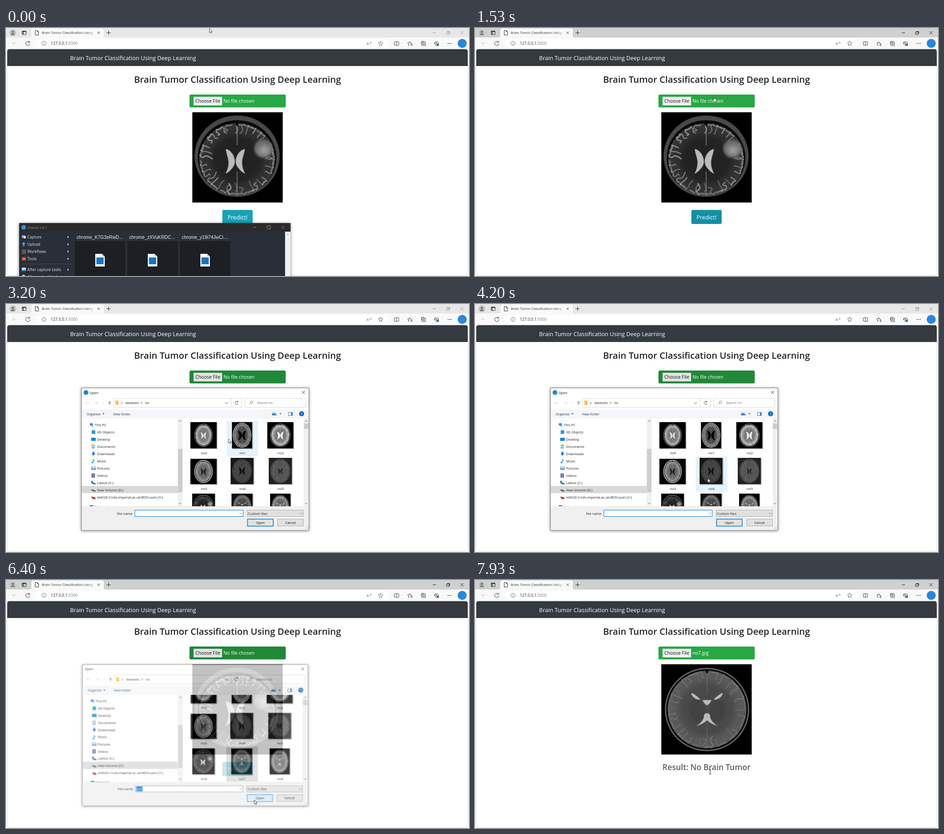
Recreate the animation shown at these times as an HTML page. Size 1022 px wide and 548 px high, loop 8000 ms.

```html
<!DOCTYPE html>
<html lang="en">
<head>
<meta charset="utf-8">
<title>Brain Tumor Classification Using Deep Learning</title>
<style>
html, body { margin: 0; width: 100%; height: 100%; overflow: hidden; background: #fff; }
#stage { display: block; width: 100%; height: 100%; font: 7.5px "Open Sans", "Noto Sans", sans-serif; font-variant-ligatures: none; }
text { white-space: pre; }
.line { fill: none; stroke: var(--c, #333); stroke-width: var(--w, 1px); }
.mid { text-anchor: middle; }
.dark { fill: #212529; }

/* every loop lasts 8 s; .step holds its values, .move blends them */
.move { animation: 8s linear infinite; }
.step { animation: 8s step-end infinite; }

#strip { animation-name: strip; }
@keyframes strip { 0%, 29.8% { fill: #e7e7e7 } 10.8%, 78.3%, to { fill: #d0d0d0 } }
#caption { animation-name: caption; }
@keyframes caption { 0%, 29.8% { stroke: #999 } 10.8%, 78.3%, to { stroke: #222 } }

#input { animation-name: input; }
@keyframes input { 0%, 19.2%, 83%, to { fill: #28a745 } 21%, 81.6% { fill: #218838 } }
#choose { animation-name: choose; }
@keyframes choose { 0%, 81.6%, to { fill: #efefef } 24.5% { fill: #e3e3e3 } }
#nofile { animation-name: nofile; }
@keyframes nofile { 0% { opacity: 1 } 81.6%, to { opacity: 0 } }
#chosen { animation-name: chosen; }
@keyframes chosen { 0% { opacity: 0 } 81.6%, to { opacity: 1 } }
#before { animation-name: before; }
@keyframes before { 0% { opacity: 1 } 80.9%, to { opacity: 0 } }
#after { animation-name: after; }
@keyframes after { 0%, 80.9% { opacity: 0 } 83.4% { opacity: .25 } 85.9% { opacity: .75 } 88.4%, to { opacity: 1 } }
#predict { animation-name: predict; }
@keyframes predict { 0%, 93.3% { opacity: 1 } 93.4%, to { opacity: 0 } }
#predictBox { animation-name: predictBox; }
@keyframes predictBox { 0%, 16.8%, 20.4%, 90% { fill: #17a2b8 } 18%, 18.4%, 92%, to { fill: #138496 } }
#result { animation-name: result; }
@keyframes result { 0%, 94.5% { opacity: 0 } 95.9% { opacity: .1 } 99.1% { opacity: .73 } to { opacity: .85 } }

#tool { animation-name: tool; transform-origin: 328px 548px; }
@keyframes tool { 0%, 10.9% { opacity: 1; transform: none } 13.4%, to { opacity: 0; transform: translateY(60px) scale(.85) } }
#minHover { animation-name: minHover; }
@keyframes minHover { 0%, 10.9%, to { opacity: 0 } 8.6% { opacity: 1 } }

#ghost { animation-name: ghost; }
@keyframes ghost { 0%, 30%, 31.6%, to { opacity: 0 } 30.8%, 31% { opacity: .05 } }
#dialog { animation-name: dialog; transform-origin: 417px 342.5px; }
@keyframes dialog {
  0%, 31.5% { opacity: 0; transform: none } 31.6% { opacity: .5; transform: scale(.98) }
  32.5%, 79.1% { opacity: 1; transform: none } 80% { opacity: .77; transform: scale(.992) }
  81.6%, to { opacity: 0; transform: scale(.95) }
}
#list { animation-name: list; }
@keyframes list { 0%, 34% { opacity: 0; transform: none } 34.1% { opacity: 1; transform: none } 60.8%, to { opacity: 1; transform: translateY(-47px) } }
#hover { animation-name: hover; }
@keyframes hover {
  0%, 60.8%, to { opacity: 0 } 39.8% { opacity: 1; transform: none }
  47.5% { opacity: 1; transform: translateY(79px) } 57.5% { opacity: 1; transform: translateY(158px) }
}
#picked { animation-name: picked; }
@keyframes picked { 0% { opacity: 0 } 60.8% { opacity: 1; fill: #cce8ff; stroke: #99d1ff } 78.2%, to { opacity: 1; fill: #d9d9d9; stroke: #d9d9d9 } }
#caret { animation-name: caret; }
@keyframes caret { 0%, 34%, 47.4%, 60.8%, to { opacity: 0 } 40.8%, 54.1% { opacity: 1 } }
#field { animation-name: field; }
@keyframes field { 0% { stroke: #0078d7 } 78.2%, to { stroke: #8a9aa6 } }
#marked { animation-name: marked; }
@keyframes marked { 0% { opacity: 0 } 78.2%, to { opacity: 1 } }
#name { animation-name: name; }
@keyframes name { 0% { opacity: 0; fill: #111 } 60.8% { opacity: 1; fill: #111 } 78.2%, to { opacity: 1; fill: #fff } }
#combo { animation-name: combo; }
@keyframes combo { 0%, 73%, to { fill: #e1e1e1; stroke: #adadad } 71% { fill: #e5f1fb; stroke: #0078d7 } }
#open { animation-name: open; }
@keyframes open { 0% { fill: #e1e1e1; stroke-width: 1.5px } 74% { fill: #e5f1fb; stroke-width: 1px } 78.2%, to { fill: #d3eaf8; stroke-width: 1px } }
#appDot { animation-name: appDot; }
@keyframes appDot { 0% { opacity: 1 } 78.2%, to { opacity: 0 } }
#openTitle { animation-name: openTitle; }
@keyframes openTitle { 0% { transform: none } 78.2%, to { transform: translateX(-13px) } }

#cursor { animation-name: cursor; }
@keyframes cursor {
  0%, 1.6% { transform: translate(449px, 1px); animation-timing-function: ease-in-out }
  9.1%, 13.4% { transform: translate(550px, 440px) }
  17.5% { transform: translate(520px, 420px) }
  18.4% { transform: translate(524px, 404px) }
  19.1% { transform: translate(528px, 152px) }
  20.9%, 22.5% { transform: translate(500px, 158px) }
  26%, 31% { transform: translate(446px, 153px) }
  32.5%, 33.4% { transform: translate(447px, 163px); animation-timing-function: ease-in-out }
  37.5%, 39.2% { transform: translate(480px, 296px) }
  40% { transform: translate(491px, 298px) }
  42.5%, 45% { transform: translate(503px, 306px) }
  54.1%, 56.6% { transform: translate(516px, 402px) }
  60.8%, 67.5% { transform: translate(510px, 423px); animation-timing-function: ease-in-out }
  76%, 80.5% { transform: translate(548px, 486px); animation-timing-function: ease-in-out }
  88.4%, 89.1% { transform: translate(527px, 439px) }
  92%, to { transform: translate(519px, 424px) }
}
#arrow { animation-name: arrow; }
@keyframes arrow { 0%, 24.2% { opacity: 1 } 17%, 90%, to { opacity: 0 } }
#hand { animation-name: hand; }
@keyframes hand { 0%, 24.2%, 93.4%, to { opacity: 0 } 17%, 90% { opacity: 1 } }
#beam { animation-name: beam; }
@keyframes beam { 0% { opacity: 0 } 93.4%, to { opacity: 1 } }
</style>
</head>
<body>
<svg id="stage" viewBox="0 0 1022 548" xmlns="http://www.w3.org/2000/svg">
  <defs>
    <filter id="soft" x="-40%" y="-40%" width="180%" height="180%"><feGaussianBlur stdDeviation="7"/></filter>
    <filter id="blur" x="-40%" y="-40%" width="180%" height="180%"><feGaussianBlur stdDeviation="2"/></filter>
    <filter id="fine" x="-30%" y="-30%" width="160%" height="160%"><feGaussianBlur stdDeviation=".7"/></filter>
    <linearGradient id="fade"><stop stop-color="#f9f9f9" stop-opacity="0"/><stop offset="1" stop-color="#f9f9f9"/></linearGradient>
    <clipPath id="listClip"><path d="M391 253H657V447H391Z"/></clipPath>
    <clipPath id="treeClip"><path d="M167 253H379V447H167Z"/></clipPath>
  </defs>

  <!-- browser -->
  <rect width="1022" height="548" fill="#f7f7f7"/>
  <rect id="strip" class="step" width="1022" height="21"/>
  <path d="M52 21Q56 21 56 17V5Q56 1 60 1H212Q216 1 216 5V17Q216 21 220 21Z" fill="#f9f9f9"/>
  <rect y="21" width="1022" height="26" fill="#f9f9f9"/>
  <circle cx="15" cy="10.500" r="7.500" fill="#c4c4c4"/>
  <g fill="#777"><circle cx="15" cy="8.500" r="2.600"/><path d="M10.500 15.500Q10.500 12 15 12T19.500 15.500Z"/></g>
  <g class="line">
    <rect x="35.500" y="6.500" width="9" height="8" rx="1.500"/><path d="M35.500 8H44.500M38 8V14" stroke-width="1.600"/>
    <path d="M64.500 5.500H69L72 8.500V15.500H64.500ZM69 5.500V8.500H72"/>
    <path d="M202 8L207 13M207 8L202 13M222 10.500H231M226.500 6V15"/>
    <path d="M14 34H23M18 30L14 34L18 38" stroke="#ccc"/>
    <path d="M51.500 31A4.700 4.700 0 1 0 52.700 34.500M52 28.500V31.500H49"/>
  </g>
  <text x="79" y="13.300" fill="#333">Brain Tumor Classification Using</text>
  <rect x="180" y="3" width="16" height="15" fill="url(#fade)"/>
  <g id="caption" class="line step"><path d="M942 10.500H949M1003 7L1010 14M1010 7L1003 14"/><path d="M972.500 9H978V14H972.500ZM974 9V7.500H979.500V12.500H978"/></g>
  <rect x="66" y="24" width="779" height="20" rx="10" fill="#fff"/>
  <g class="line" style="--w:.9px">
    <circle cx="84" cy="34" r="4.700" stroke="#666"/><path d="M84 33V37M84 31V32" stroke="#666"/>
    <path d="M827 29L828.500 32.300 832 32.700 829.400 35.100 830.100 38.600 827 36.900 823.900 38.600 824.600 35.100 822 32.700 825.500 32.300Z" stroke="#555"/>
    <path d="M803 31Q804.500 33 803 34.500M805 30Q807 33 805 35" stroke="#555" stroke-width=".7"/>
    <path d="M861 30.500H858Q857 30.500 857 31.500V37Q857 38 858 38H861M863 30.500H866Q867 30.500 867 31.500V37Q867 38 866 38H863M862 29V40"/>
    <path d="M891 30L892.200 32.700 895 33M891 30L889.700 32.700 886.500 33.200 889 35.300 888.300 38.500 890.500 37.300M893 35H897M893 37H897M894 39H897"/>
    <path d="M918.500 31.500H926V39H918.500ZM917 36.500V29.500H924M922.200 33V37.500M920 35.200H924.500"/>
    <path d="M950 39L945.500 34.300Q945 31 947.500 30.300 949.500 30.200 950 31.800 950.500 30.200 952.500 30.300 955 31 954.500 34.300ZM946 34H948.500L949.500 32 951 35.500H952"/>
  </g>
  <circle cx="953" cy="37" r="2.700" fill="#2e7d46"/>
  <text x="796" y="37" font-size="8" fill="#555">A</text>
  <g fill="#333"><circle cx="976" cy="34" r=".9"/><circle cx="979.500" cy="34" r=".9"/><circle cx="983" cy="34" r=".9"/></g>
  <circle cx="1007" cy="34" r="10" fill="#2b87dd"/>
  <text x="99" y="37.200" font-size="8.700" fill="#222">127.0.0.1<tspan fill="#767676">:5000</tspan></text>

  <!-- page -->
  <rect x="2.500" y="47" width="1017" height="499" rx="5" fill="#fff" stroke="#e4e4e4"/>
  <path d="M2.700 84V52Q2.700 46.700 8 46.700H1014Q1019.300 46.700 1019.300 52V84Z" fill="#343a40"/>
  <text x="141.500" y="70.500" font-size="12.600" fill="#fff">Brain Tumor Classification Using Deep Learning</text>
  <text class="mid dark" x="511" y="121.300" font-size="20" font-weight="600">Brain Tumor Classification Using Deep Learning</text>
  <rect id="input" class="move" x="405" y="147" width="212.500" height="28.500" rx="3"/>
  <rect id="choose" class="step" x="414" y="152" width="63" height="19"/>
  <g font-size="10.300">
    <text x="418" y="165.300" fill="#111">Choose File</text>
    <text id="nofile" class="step" x="480" y="165.300" fill="#fff">No file chosen</text>
    <text id="chosen" class="step" x="480" y="165.300" fill="#fff">no7.jpg</text>
  </g>
  <g id="before" class="step"></g>
  <g id="after" class="move"></g>
  <g id="predict" class="move">
    <rect id="predictBox" class="move" x="477.500" y="402" width="67" height="31" rx="3.300"/>
    <text class="mid" x="511" y="422.800" font-size="12.600" fill="#fff">Predict!</text>
  </g>
  <text id="result" class="mid dark move" x="511" y="420" font-size="17.400" font-weight="600">Result: No Brain Tumor</text>

  <!-- capture tool -->
  <g id="tool" class="move">
    <rect x="29" y="431" width="599" height="130" fill="#2a2e38" style="filter:drop-shadow(0 1px 3px #0008)"/>
    <rect x="29" y="431" width="599" height="19" fill="#2b2b2b"/>
    <rect id="minHover" class="step" x="535" y="431" width="29" height="19" fill="#454545"/>
    <circle cx="39" cy="440.500" r="5.200" fill="#2f8fd6"/>
    <text x="47" y="443.700" font-size="8" fill="#999">ShareX 14.1</text>
    <path class="line" style="--c:#888" d="M546 440.500H553M576.500 437H583.500V444H576.500ZM608.500 437.500L615 444M615 437.500L608.500 444"/>
    <rect x="616" y="450" width="12" height="98" fill="#efefef"/><rect x="617" y="451" width="10" height="11" fill="#fff"/>
    <path class="line" d="M619.500 458L622 455.500 624.500 458"/>
    <path d="M34 521.500H144" stroke="#454b58"/>
    <path d="M35 458H42V464H35Z" fill="#9ab"/><path d="M39 460H44V465H39Z" fill="#dde"/>
    <path d="M39 472.500L43.500 477.500H40.500V482.500H37.500V477.500H34.500Z" fill="#3ba3e8"/>
    <path d="M35 507H44V514H35ZM37.500 507V505.500H41.500V507" fill="#d33a32"/><path d="M35 510H44" stroke="#fbb"/>
    <path d="M35 529.500H44V537H35Z" fill="#cfe2f5"/><path d="M35 537L38 533 40 535 42 532 44 537Z" fill="#4a90d0"/>
    <path d="M35 548Q35 546 39 545L44 548Z" fill="#ccd"/>
  </g>

  <!-- dialog being laid out -->
  <g id="ghost" class="move">
    <path d="M12 10H388V347H12Z" fill="#fff" stroke="#888"/>
    <path class="line" style="--c:#888" d="M197 320H259V335H197ZM281 321H330V337H281ZM337 321H383V337H337Z"/>
    <circle cx="374" cy="36" r="5" fill="#0067c0"/>
    <g fill="#333"><text x="40" y="63">Quick access</text><text x="155" y="332">File name:</text><text x="297" y="332">Open</text><text x="348" y="332">Cancel</text></g>
  </g>

  <!-- open dialog -->
  <g id="dialog" class="move">
    <rect x="166.500" y="185.500" width="502" height="314.500" fill="#fff" stroke="#7d7d7d" style="filter:drop-shadow(0 1px 3px #0007)"/>
    <circle id="appDot" class="step" cx="176.500" cy="195.500" r="5.300" fill="#1f8ac9"/>
    <text id="openTitle" class="step" x="184.500" y="198.500" fill="#111">Open</text>
    <path class="line" d="M653.500 192L660 198.500M660 192L653.500 198.500"/>
    <path class="line" style="--c:#ccc;--w:.9px" d="M176 218.500H183M179 215.500L176 218.500 179 221.500M196 218.500H203M200 215.500L203 218.500 200 221.500M213.500 217.500L215 219 216.500 217.500"/>
    <path class="line" style="--c:#555" d="M229 223V215.500M226 218.500L229 215.500 232 218.500"/>
    <path class="line" style="--c:#d9d9d9" d="M237.500 208.500H520.500V228.500H237.500ZM497.500 208.500V228.500M527.500 208.500H661.500V228.500H527.500Z"/>
    <path d="M241 213H246L248 215V223H241Z" fill="#ffcf57"/><path d="M245 215H248V223H245Z" fill="#f0b43a"/>
    <path class="line" style="--w:.9px" d="M484 217.500L487 220.500 490 217.500M511.500 216A3.300 3.300 0 1 0 512.300 219M512 214V216.500H509.500M298 216L300.500 218.500 298 221"/>
    <g class="line" style="--c:#888"><circle cx="542" cy="217" r="2.700"/><path d="M540 219L536.500 222"/></g>
    <g fill="#222"><text x="253.500" y="221">«</text><text x="263.500" y="221">datasets</text><text x="307" y="221">no</text><text x="554" y="221" fill="#6d6d6d">Search no</text></g>
    <rect x="167" y="233" width="501" height="20" fill="#f4f6f9"/>
    <g fill="#1e395b"><text x="178" y="245.700">Organize</text><text x="236.500" y="245.700">New folder</text><path d="M213 241.500H217.500L215.200 244ZM603.500 241.500H608L605.800 244Z"/></g>
    <path d="M587 239H597V246H587Z" fill="#c5dcf0"/><path d="M587 246V243L591 241 597 244V246Z" fill="#3d7fc0"/>
    <path class="line" style="--c:#5a7fa5" d="M623.500 239.500H632.500V246.500H623.500Z"/><path d="M629 239H633V247H629Z" fill="#4a8ac8"/>
    <circle cx="652.500" cy="242.500" r="5.500" fill="#0067c0"/><text class="mid" x="652.500" y="245.500" font-weight="700" fill="#fff">?</text>

    <g id="tree" clip-path="url(#treeClip)" fill="#222"><rect x="167" y="402" width="212" height="16" fill="#d9d9d9"/></g>
    <path d="M379 253H390V447H379ZM657 253H668V447H657Z" fill="#f0f0f0"/>
    <path d="M379.500 320H389.500V416H379.500ZM657.500 264H667.500V276H657.500Z" fill="#cdcdcd"/>
    <path class="line" style="--c:#555" d="M382 260L384.500 257.500 387 260M382 439.500L384.500 442 387 439.500M660 260L662.500 257.500 665 260M660 439.500L662.500 442 665 439.500"/>
    <g clip-path="url(#listClip)"><g id="list" class="step">
      <rect id="hover" class="step" x="487" y="258" width="70" height="78" fill="#e5f3ff"/>
      <rect id="picked" class="step" x="487.500" y="415.500" width="69" height="77.500"/>
    </g></g>

    <rect x="167" y="447" width="501" height="52.500" fill="#f0f0f0"/>
    <text x="245" y="465.700" fill="#222">File name:</text>
    <rect id="field" class="step" x="284.500" y="455.500" width="239" height="14" fill="#fff"/>
    <rect id="marked" class="step" x="286.500" y="457" width="14" height="11" fill="#0078d7"/>
    <rect id="caret" class="step" x="286" y="458" width="1" height="10"/>
    <text id="name" class="step" x="287" y="465.700">no7</text>
    <rect id="combo" class="step" x="532.500" y="455.500" width="124" height="14"/>
    <text x="534" y="465.700" fill="#222">Custom files</text>
    <path class="line" style="--c:#555;--w:.8px" d="M516 461.500L518.500 464 521 461.500M649 461.500L651.500 464 654 461.500"/>
    <rect id="open" class="step" x="533.300" y="475.300" width="56.500" height="15.500" stroke="#0078d7"/>
    <rect x="599.500" y="475.500" width="57" height="15" fill="#e1e1e1" stroke="#adadad"/>
    <g class="mid" fill="#111"><text x="561.500" y="485.800">Open</text><text x="628" y="485.800">Cancel</text></g>
    <path d="M660 498L667 491M663 498L667 494M666 498L667 497" stroke="#aaa" stroke-dasharray="1.500 1"/>
  </g>

  <g id="cursor" class="move" fill="#fff" stroke="#111" stroke-width=".7" stroke-linejoin="round">
    <path id="arrow" class="step" d="M0 0V9.200L2.100 7.300 3.500 10.400 5 9.800 3.600 6.800H6.500Z"/>
    <path id="hand" class="step" d="M-.9.600Q0-.6.900.600V4L4 4.700Q5.400 5.200 5.200 6.500L4.500 11H0L-2.900 7.300Q-3 5.900-1.800 6.200L-.9 7Z"/>
    <path id="beam" class="step" d="M-2-5Q0-5 0-4Q0-5 2-5M0-4V4M-2 5Q0 5 0 4Q0 5 2 5" fill="none" stroke-width="1"/>
  </g>
</svg>
<script>
const $ = id => document.getElementById(id);

function el(tag, attrs, parent, text) {
  const node = document.createElementNS("http://www.w3.org/2000/svg", tag);
  for (const key in attrs) node.setAttribute(key, attrs[key]);
  if (text) node.textContent = text;
  return parent.appendChild(node);
}

const random = seed => () => (seed = seed * 16807 % 2147483647) / 2147483647;

const SHAPES = {
  wings: "M-1 2C0-10-8-25-21-28C-21-20-15-8-15 2Q-15 16-22 27Q-14 24-8 16Q-2 10-1 2Z",
  horns: "M-35-36C-31-37-22-29-15-23Q-19-20-27-25Q-34-30-35-36ZM0-21H-10Q-6-12 0-9ZM0 8Q-8 9-7 18Q-11 29-24 37Q-8 32 0 24Z"
};

// Soft axial scan: scalp, skull, tissue, seeded folds and a mirrored ventricle.
function scan(parent, [x, y, w, h], options) {
  const H = 200 * h / w;
  const o = { bg: "#000", cx: 100, cy: H / 2, rx: 70, ry: 88, rim: 5, gap: 5, lift: 0, scalp: "#777", tissue: "#666",
    core: "#444", fold: "#bbb", n: 26, lw: 2.5, vent: "#ddd", shape: "wings", size: 1, vx: 0, vy: 4, seed: 11, ...options };
  const svg = el("svg", { x, y, width: w, height: h, viewBox: `0 0 200 ${H}` }, parent);
  const oval = (inset, cy, fill, more) =>
    el("ellipse", { cx: o.cx, cy, rx: o.rx - inset, ry: o.ry - inset, fill, ...more }, svg);
  el("rect", { width: 200, height: H, fill: o.bg }, svg);
  oval(0, o.cy, o.scalp, { filter: "url(#fine)" });
  oval(o.rim, o.cy + o.lift / 2, "#080808");
  const inset = o.rim + o.gap, cy = o.cy + o.lift;
  oval(inset, cy, o.tissue, { stroke: o.fold, "stroke-opacity": .5 });
  oval(inset + o.rx * .26, cy, o.core, { filter: "url(#soft)" });

  const rnd = random(o.seed);
  const at = (r, a) => `${(o.cx + (o.rx - inset) * r * Math.cos(a)).toFixed(1)} ${(cy + (o.ry - inset) * r * Math.sin(a)).toFixed(1)}`;
  const folds = el("g", { fill: "none", stroke: o.fold, "stroke-linecap": "round", filter: "url(#fine)" }, svg);
  for (let i = 0; i < o.n; i++) {
    const a = (i + rnd() * .7) / o.n * 2 * Math.PI, bend = (rnd() - .5) * .26, deep = .86 - rnd() * .2;
    const hook = bend < 0 ? .13 : -.13;
    el("path", { d: `M${at(1, a)}Q${at(.94, a + bend)} ${at(.88, a + bend / 3)}T${at(deep, a + bend)}`,
      "stroke-width": o.lw * (.6 + rnd() * .6), opacity: .45 + rnd() * .5 }, folds);
    el("path", { d: `M${at(.99, a)}Q${at(.95, a + hook / 3)} ${at(.97, a + hook)}`, "stroke-width": o.lw * 1.2, opacity: .6 }, folds);
  }
  el("path", { d: `M${at(.98, -Math.PI / 2)}L${at(.4, -Math.PI / 2)}M${at(.98, Math.PI / 2)}L${at(.35, Math.PI / 2)}`, "stroke-width": o.lw * .7, opacity: .7 }, folds);
  for (const side of [-1, 1]) {
    const half = el("g", { filter: "url(#fine)", transform: `translate(${o.cx + o.vx} ${cy + o.vy}) scale(${side * o.size} ${o.size})` }, svg);
    if (o.lobe) el("ellipse", { cx: -22, cy: -2, rx: 15, ry: 24, fill: o.lobe, stroke: "#333", transform: "rotate(-14)", filter: "url(#blur)" }, half);
    el("path", { d: SHAPES[o.shape], fill: o.vent }, half);
  }
  if (o.spot) {
    const [sx, sy, r] = o.spot;
    el("circle", { cx: sx, cy: sy, r, fill: "#666", filter: "url(#blur)" }, svg);
    el("ellipse", { cx: sx + 2, cy: sy + 4, rx: r * .65, ry: r * .5, fill: "#aaa", filter: "url(#soft)" }, svg);
  }
  el("path", { d: `M${o.cx - 5} ${cy - o.ry + inset - 2}h10l-5 9Z`, fill: "#0a0a0a" }, svg);
}

const lesion = { cx: 99, cy: 97, rx: 94, ry: 90, rim: 7, gap: 4, lift: 7, scalp: "#484848", tissue: "#333", core: "#242424",
  fold: "#aaa", n: 34, lw: 2.2, vent: "#bbb", vx: -4, vy: 5, spot: [157, 80, 20] };
const healthy = { cx: 101, cy: 100, rx: 93, ry: 92, rim: 2.5, gap: 4, scalp: "#757575", tissue: "#5a5a5a", core: "#4a4a4a",
  fold: "#858585", n: 32, lw: 1.4, vent: "#bbb", shape: "horns", vy: 0, seed: 5, lobe: "#434343" };
const photo = [411.3, 186.2, 199.7, 199.5];
scan($("before"), photo, lesion);
scan($("after"), photo, healthy);

const thumbs = [
  [58, 58, { tissue: "#a5a5a5", core: "#777", fold: "#ddd", vent: "#ddd" }],
  [45, 58, { scalp: "#eee", rx: 90, ry: 122, tissue: "#777", core: "#4a4a4a", vent: "#050505", size: 1.8 }],
  [58, 58, { rx: 78, ry: 90, tissue: "#aaa", core: "#777", fold: "#eee", vent: "#fff", size: 1.1 }],
  [58, 56, { scalp: "#ddd", ry: 88, tissue: "#888", core: "#666", vent: "#222" }],
  [51, 58, { bg: "#181818", rx: 84, ry: 102, scalp: "#5d5d5d", gap: 2, tissue: "#4a4a4a", core: "#444", fold: "#222", vent: "#141414", size: 1.3 }],
  [51, 58, { bg: "#222", rx: 84, ry: 102, scalp: "#777", gap: 2, tissue: "#5e5e5e", core: "#555", fold: "#333", vent: "#252525" }],
  [50, 58, { ...lesion, cy: 114, rx: 92, ry: 106, fold: "#888", n: 24, lw: 3, vent: "#ddd", spot: [157, 90, 22] }],
  [47, 58, { ...healthy, cy: 123, rx: 88, ry: 114, bg: "#0c0c0c", n: 26, lw: 2.5, tissue: "#6c6c6c", size: 1.2 }],
  [45, 58, { rx: 88, ry: 116, tissue: "#888", core: "#666", fold: "#ccc", vent: "#ccc", shape: "horns", size: 1.2 }]
];
thumbs.forEach(([w, h, look], i) => {
  const col = i % 3, row = (i - col) / 3;
  const x = [436, 521, 605.5][col] - w / 2, y = 319 - h + 79 * row;
  el("rect", { x: x + 1, y: y + 1, width: w + .8, height: h + .8, fill: "#0004" }, $("list"));
  scan($("list"), [x, y, w, h], { seed: 20 + i, ...look });
  el("text", { x: [437, 522, 606.5][col], y: 331.5 + 79 * row, class: "mid", fill: "#222" }, $("list"), "no" + i);
});

const page = "M1 0H8V9H1Z", drive = "M0 4L3 3 10 6V8H5L0 5Z";
const tree = [
  ["This PC", "#3b8fd0", "M1 1H8V6H1ZM4 7H10V8H4Z"],
  ["3D Objects", "#22a0c8", "M1 1L5 0 9 1V8L5 9 1 8Z"],
  ["Desktop", "#1a86d0", "M0 1H10V8H0Z"],
  ["Documents", "#9db2c4", page],
  ["Downloads", "#2a7fd0", "M3 0H7V4H9.500L5 9 .5 4H3Z"],
  ["Music", "#2a8fd8", "M4 0L8 3 7 5 5 3V8A2 1.600 0 1 1 4 6.500Z"],
  ["Pictures", "#5a9bd0", "M0 1H10V8H0Z"],
  ["Videos", "#4a4f66", page],
  ["Lattice (C:)", "#666", drive],
  ["New Volume (D:)", "#666", drive],
  ["kt4026 (\\\\rds.imperial.ac.uk\\RDS\\user) (Y:)", "#666", drive],
  ["Network", "#3b8fd0", "M1 1H9V6H1Z"]
];
tree.forEach(([label, fill, d], i) => {
  const top = i === 0 || i === 11, x = top ? 184 : 188, y = 267 + 16 * i + (i === 11 ? 5 : 0);
  const icon = el("g", { transform: `translate(${x} ${y - 4.5})` }, $("tree"));
  el("path", { d, fill }, icon);
  if (label === "Documents") el("path", { d: "M2.500 3H6.500M2.500 5H6.500", stroke: "#fff" }, icon);
  if (label === "Pictures") el("path", { d: "M1 2H9V4L5 5 1 4Z", fill: "#dcecf8" }, icon);
  if (label === "Videos") el("path", { d: "M3 1H6V8H3Z", fill: "#8fa6d8" }, icon);
  if (i === 8) el("rect", { width: 4, height: 4, fill: "#1f9be0" }, icon);
  if (i === 10) el("path", { d: "M3 4L8 9M8 4L3 9", stroke: "#d22", "stroke-width": 1.6 }, icon);
  el("text", { x: top ? 196 : 201, y: y + 2.8 }, $("tree"), label);
});

const menu = [["Capture", 462], ["Upload", 478], ["Workflows", 494], ["Tools", 510], ["After capture tasks", 534], ["After upload tasks", 550]];
menu.forEach(([label, y]) => {
  el("text", { x: 47, y: y + 3, "font-size": 8.5, fill: "#e8e8e8" }, $("tool"), label);
  el("path", { d: `M136 ${y - 2.5}L139 ${y}L136 ${y + 2.5}Z`, fill: "#e8e8e8" }, $("tool"));
});
for (let i = 0; i < 9; i++)
  el("rect", { x: 35 + i % 3 * 3.3, y: 490 + Math.floor(i / 3) * 3.3, width: 2.3, height: 2.3, fill: ["#e05548", "#4caf60", "#4a90d8"][i % 3] }, $("tool"));
["chrome_K7G3eRwD...", "chrome_zXVuKRDC...", "chrome_y19i74JwCi...."].forEach((label, i) => {
  const x = 152 + 116 * i;
  el("text", { x: x + 4, y: 465.5, "font-size": 10.2, "font-family": "Liberation Sans, Arial, sans-serif", fill: "#f0f0f0" }, $("tool"), label);
  el("rect", { x, y: 471, width: 111, height: 90, rx: 2, fill: "#1c1f24" }, $("tool"));
  el("path", { d: `M${x + 45} 499h15l6 6v22h-21Z`, fill: "#fff" }, $("tool"));
  el("path", { d: `M${x + 60} 499v6h6Z`, fill: "#c8ced4" }, $("tool"));
  el("rect", { x: x + 47.5, y: 507, width: 16, height: 15, fill: "#1873c4" }, $("tool"));
});
</script>
</body>
</html>
```
